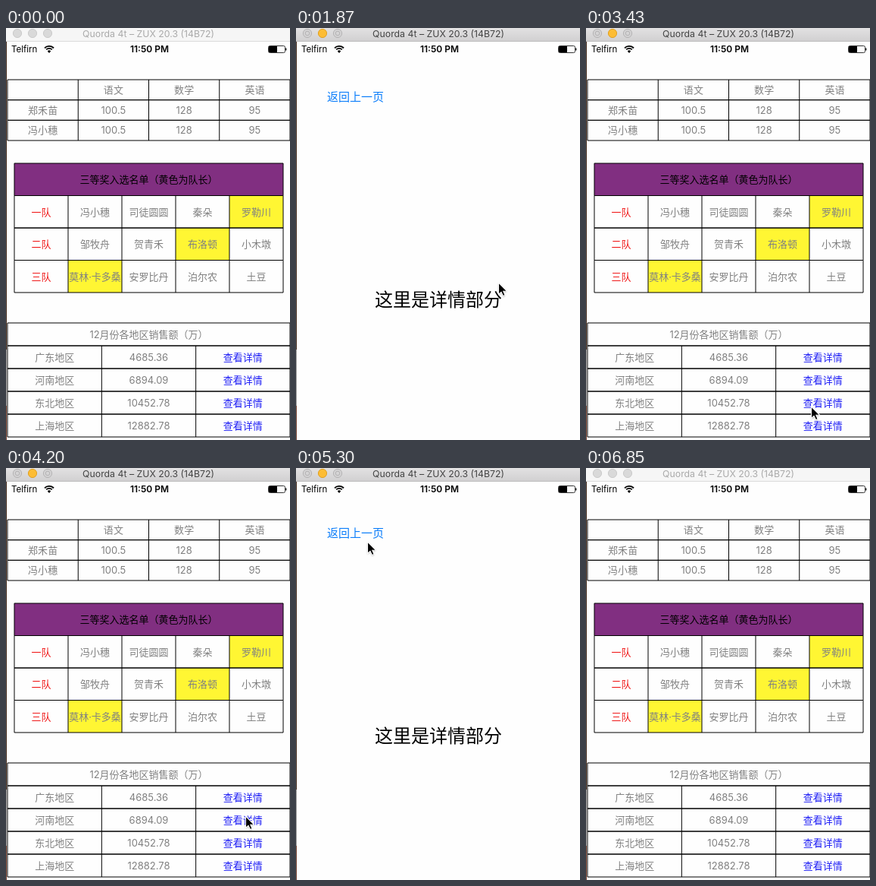
These frames come from a looping animation (375x542 px, 6.95 s). An HTML page with a canvas:

```html
<!DOCTYPE html>
<html lang="zh">
<head>
<meta charset="utf-8">
<title>表格演示</title>
<style>
html, body { margin: 0; width: 100%; height: 100%; overflow: hidden; background: #fefefe; }
canvas { display: block; }
</style>
</head>
<body>
<canvas id="stage" width="375" height="542"></canvas>
<script>
const ctx = document.getElementById('stage').getContext('2d');
const W = 375, H = 542, LOOP = 6950, TICK = 58;
const SCREEN_TOP = 18, SCREEN_HEIGHT = 667;
const PAPER = '#fefefe', GREY = '#808080', RED = '#f01818', BLUE = '#1c1cf5', YELLOW = '#fff633';
const FONT = 'Inter, "Noto Sans CJK SC", "Noto Sans CJK", sans-serif';

// When the detail page slides in, when its button is pressed, when it slides out.
const VISITS = [
  { open: 1503, press: 3010, close: 3048 },
  { open: 4403, press: 5560, close: 5600 }
];

// Pointer moves: start time, end time, resting point.
const ENTRY = [384, 418];
const MOVES = [
  [180, 924, 311, 439],
  [930, 1102, 311, 432],
  [1710, 2030, 209, 208],
  [2230, 2784, 77, 84],
  [3115, 3422, 297, 498],
  [3680, 4176, 316, 458],
  [4660, 4988, 117, 111],
  [5140, 5394, 77, 86],
  [5693, 5916, 268, 411],
  [6060, 6322, 352, 546]
];

const clamp = u => Math.min(1, Math.max(0, u));
const smooth = u => u * u * (3 - 2 * u);

function pointerAt(t) {
  let [x, y] = ENTRY;
  for (const [start, end, toX, toY] of MOVES) {
    const e = smooth(clamp((t - start) / (end - start)));
    x += (toX - x) * e;
    y += (toY - y) * e;
  }
  return [Math.round(x), Math.round(y)];
}

// Share of the distance still left in a critically damped slide.
function remaining(ms) {
  const x = Math.max(0, ms) * 0.02;
  return (1 + x) * Math.exp(-x);
}

function rect(x, y, w, h, color) {
  ctx.fillStyle = color;
  ctx.fillRect(x, y, w, h);
}

function ring(x, y, radius, stroke, fill) {
  ctx.beginPath();
  ctx.arc(x, y, radius, 0, Math.PI * 2);
  ctx.strokeStyle = stroke;
  ctx.lineWidth = 1;
  if (fill) {
    ctx.fillStyle = fill;
    ctx.fill();
  }
  ctx.stroke();
}

function text(str, x, cy, { color = GREY, size = 13, weight = 400, align = 'center' } = {}) {
  ctx.font = `${weight} ${size}px ${FONT}`;
  ctx.textAlign = align;
  ctx.fillStyle = color;
  ctx.fillText(str, x, Math.round(cy + size * 0.37));
}

// Cells are strings or [string, color, background]; each row shares the width evenly.
function table(x, y, w, h, rows) {
  const cellH = h / rows.length;
  const eachCell = paint => rows.forEach((row, r) => row.forEach((cell, c) => {
    const cellW = w / row.length;
    paint([].concat(cell), x + c * cellW, y + r * cellH, cellW);
  }));
  eachCell(([label, color, back], left, top, cellW) => {
    if (back) rect(left, top, cellW, cellH, back);
    text(label, left + cellW / 2, top + cellH / 2, { color });
  });
  ctx.strokeStyle = '#000';
  ctx.lineWidth = 1;
  ctx.beginPath();
  rows.forEach((row, r) => {
    const top = y + r * cellH;
    ctx.rect(x, top, w, cellH);
    for (let c = 1; c < row.length; c++) {
      ctx.moveTo(x + c * w / row.length, top);
      ctx.lineTo(x + c * w / row.length, top + cellH);
    }
  });
  ctx.stroke();
}

function drawTables() {
  table(2, 68, 373, 80, [
    ['', '语文', '数学', '英语'],
    ['郑禾苗', '100.5', '128', '95'],
    ['冯小穗', '100.5', '128', '95']
  ]);
  table(11, 178, 355, 170, [
    [['三等奖入选名单（黄色为队长）', '#000', '#812f81']],
    [['一队', RED], '冯小穗', '司徒圆圆', '秦朵', ['罗勒川', GREY, YELLOW]],
    [['二队', RED], '邹牧舟', '贺青禾', ['布洛顿', GREY, YELLOW], '小木墩'],
    [['三队', RED], ['莫林·卡多桑', GREY, YELLOW], '安罗比丹', '泊尔农', '土豆']
  ]);
  const more = ['查看详情', BLUE];
  table(2, 388, 373, 150, [
    ['12月份各地区销售额（万）'],
    ['广东地区', '4685.36', more],
    ['河南地区', '6894.09', more],
    ['东北地区', '10452.78', more],
    ['上海地区', '12882.78', more]
  ]);
}

function drawDetail(offset, pressed) {
  rect(1, SCREEN_TOP + offset, W, SCREEN_HEIGHT, PAPER);
  text('返回上一页', 41, 85 + offset, {
    color: pressed ? 'rgba(0,122,255,.25)' : '#0a7dfa', size: 15, align: 'left'
  });
  text('这里是详情部分', 188, 352 + offset, { color: '#000', size: 24 });
}

function drawStatusBar() {
  rect(1, SCREEN_TOP, W, 18, PAPER);
  text('Telfirn', 7, 28, { color: '#000', size: 11.5, align: 'left' });
  text('11:50 PM', 189.5, 28, { color: '#000', size: 12, weight: 600 });

  const fan = [-Math.PI * 0.76, -Math.PI * 0.24];
  ctx.strokeStyle = ctx.fillStyle = '#000';
  ctx.lineWidth = 1.8;
  for (const radius of [8.2, 5.2]) {
    ctx.beginPath();
    ctx.arc(57, 32, radius, ...fan);
    ctx.stroke();
  }
  ctx.beginPath();
  ctx.moveTo(57, 33);
  ctx.arc(57, 32.5, 3, ...fan);
  ctx.fill();

  ctx.strokeStyle = '#333';
  ctx.lineWidth = 1;
  ctx.beginPath();
  ctx.roundRect(346.5, 23.5, 22, 9, 2);
  ctx.stroke();
  rect(347, 24, 11, 8, '#000');
  rect(369, 26.5, 1.5, 3, '#333');
}

function drawTitleBar(active) {
  const back = ctx.createLinearGradient(0, 0, 0, SCREEN_TOP);
  back.addColorStop(0, active ? '#e2e1e2' : '#f6f6f6');
  back.addColorStop(1, active ? '#d0cfd0' : '#f6f6f6');
  rect(0, 0, W, SCREEN_TOP, back);
  rect(0, SCREEN_TOP - 1, W, 1, active ? '#bdbcbd' : '#dadada');
  for (let i = 0; i < 3; i++) {
    const x = 15 + 20 * i;
    if (!active) {
      ring(x, 7, 5.6, '#cbcbcb', '#d9d9d9');
    } else if (i === 1) {
      ring(x, 7, 5.6, '#dfa023', '#fdbd35');
    } else {
      ring(x, 7, 5.6, '#b4b3b4', '#d5d4d5');
      ring(x, 7, 2.8, '#b4b3b4');
    }
  }
  text('Quorda 4t – ZUX 20.3 (14B72)', 188, 7, { color: active ? '#444' : '#aaa', size: 12.3 });
}

function drawDesktopEdge() {
  rect(0, SCREEN_TOP, 1, H, '#42291b');
  rect(0, 423, 1, 74, '#9c9a9a');
  rect(0, 497, 1, 45, '#74402f');
}

function drawPointer([x, y]) {
  ctx.save();
  ctx.translate(x + 0.5, y);
  ctx.beginPath();
  ctx.moveTo(0, 0);
  for (const [px, py] of [[0, 15.5], [3.5, 12.3], [6, 17.5], [8.6, 16.4], [6.3, 11.3], [11, 11]]) {
    ctx.lineTo(px, py);
  }
  ctx.closePath();
  ctx.shadowColor = 'rgba(0,0,0,.4)';
  ctx.shadowBlur = 2;
  ctx.shadowOffsetY = 1;
  ctx.fillStyle = '#000';
  ctx.fill();
  ctx.shadowColor = 'transparent';
  ctx.strokeStyle = '#fff';
  ctx.lineWidth = 1.1;
  ctx.stroke();
  ctx.restore();
}

function draw(t) {
  rect(0, 0, W, H, PAPER);
  drawTables();
  for (const { open, press, close } of VISITS) {
    if (t < open || t > close + 600) continue;
    const left = t < close ? remaining(t - open) : 1 - remaining(t - close);
    drawDetail(Math.round(SCREEN_HEIGHT * left), t >= press && t < close);
  }
  drawStatusBar();
  drawTitleBar(t >= 1450 && t < 6840);
  drawDesktopEdge();
  drawPointer(pointerAt(t));
}

const began = performance.now();
function frame() {
  const t = (performance.now() - began) % LOOP;
  draw(Math.floor(t / TICK) * TICK);
  requestAnimationFrame(frame);
}
frame();
</script>
</body>
</html>
```
